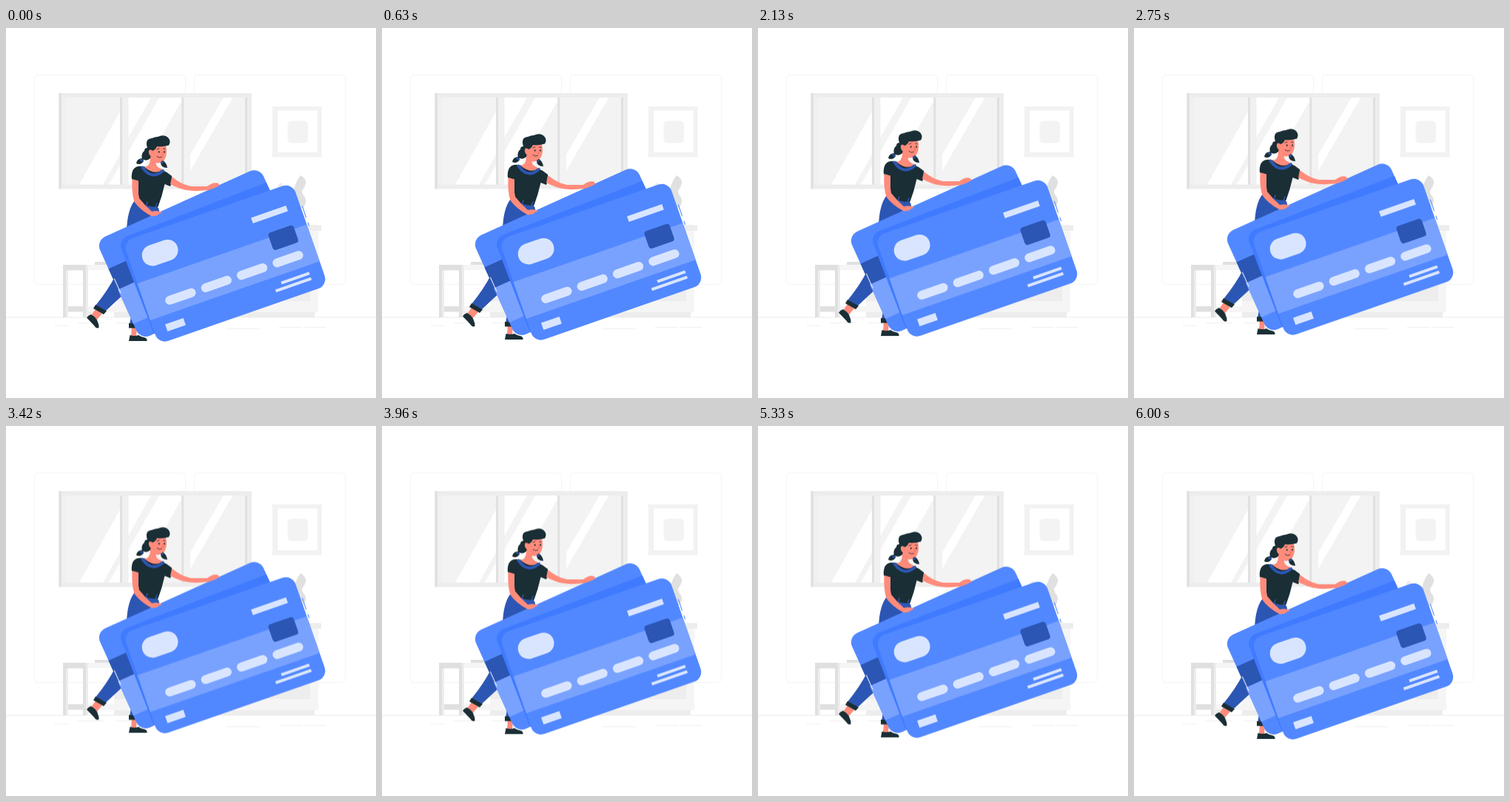
Animation, 500 px wide and 500 px high, one loop 6040 ms. Source, as an HTML page:

```html
<!DOCTYPE html>
<html lang="en">
<head>
<meta charset="utf-8">
<title>Woman with bank cards</title>
<style>
  html, body { margin: 0; width: 100%; height: 100%; overflow: hidden; background: #fff; }
  svg { display: block; width: 100vw; height: 100vh; }
  .float { animation: lift 3020ms linear infinite alternate; }
  @keyframes lift { to { transform: translateY(-9.8px); } }
  .g1 { fill: #f3f3f3; } .g2 { fill: #ededed; } .g3 { fill: #e0e0e0; } .white { fill: #fff; }
  .blue { fill: #5288ff; } .shade { fill: #407bff; } .light { fill: #79a2ff; }
  .navy { fill: #2c56b3; } .pale { fill: #d9e5ff; }
  .skin { fill: #ff8b7b; } .dark { fill: #1a2e35; }
  .line { fill: none; stroke-linecap: round; stroke-linejoin: round; }
</style>
</head>
<body>
<svg viewBox="0 0 500 500">
  <defs>
    <rect id="card" x="-121.2" y="-73.5" width="242.4" height="147" rx="14"/>
    <clipPath id="cardClip"><use href="#card"/></clipPath>
    <clipPath id="backClip"><use href="#card" transform="translate(262.1 304.6) rotate(-24.3)"/></clipPath>
    <rect id="pill" x="-21.5" y="-6" width="43" height="12" rx="6"/>
  </defs>

  <!-- Walls and floor -->
  <g class="line" stroke="#f4f4f4">
    <rect x="38.5" y="63.5" width="204" height="283" rx="5"/>
    <rect x="254.5" y="63.5" width="204" height="283" rx="5"/>
    <path d="M0 391H500" stroke="#ebebeb"/>
    <path d="M66 402.5H82M97 398.5H133M149 398.5H172M297 406.5H343M369 404.5H400M404 404.5H432" stroke="#f1f1f1"/>
  </g>

  <!-- Window -->
  <path class="g2" d="M75 88H332V217.5H75Z"/>
  <path class="g3" d="M71.3 88H75V217.5H71.3Z"/>
  <path class="g1" d="M80.5 94H326V211.5H80.5Z"/>
  <path fill="#f0f0f0" d="M75 94H81V211.5H75ZM157 94H165.5V211.5H157Z"/>
  <g class="white">
    <path d="M154 113V171L131 211.5H99ZM154 185V211.5H139Z"/>
    <path d="M165.5 94H196L165.5 148ZM207 94H237.5V98L173 211.5H165.5V167Z"/>
    <path d="M294 94H306.5L249 193V171Z"/>
  </g>
  <path class="g3" d="M154 94H157V211.5H154ZM237.3 94H240.2V211.5H237.3ZM323 94H326V211.5H323Z"/>

  <!-- Picture frame -->
  <path fill="#f2f2f2" d="M360 106H426.5V174.5H360Z"/>
  <path class="white" d="M367.5 111.5H421V168H367.5Z"/>
  <rect class="g1" x="380.5" y="125.5" width="27.5" height="30" rx="5"/>

  <!-- Desk, cabinet and plant -->
  <path fill="#f5f5f5" d="M108 320H380V266H422V384H146V327H108ZM111 376H146V384H111Z"/>
  <path class="g2" d="M146 328H411V369H146ZM146 384H417V391H146ZM380 266.5H426V274H380Z"/>
  <path fill="#f5f5f5" d="M146 370H422V384H146Z"/>
  <path class="g3" d="M77 320H108V327.5H77ZM77 327H84V391H77ZM104 327H108V391H104ZM84 376H104V383.5H84ZM120 316H139V320H120Z"/>
  <path class="g2" d="M108 320H111V391H108ZM111 383H125V388H111ZM81 328H84V391H81Z"/>
  <path class="g3" d="M398 199Q404 202 405.5 209Q404 215 400 220Q400 224 404 229Q407 235 402 242L392 246Q384 229 391 212Q394 204 398 199Z"/>
  <path class="g2" d="M373 209Q363 211 370 225L384 238Q376 221 373 209Z"/>

  <g class="float">
    <!-- Legs -->
    <path class="skin" d="M121 380L130 386L123 394L116 387ZM170 403H177L176 417H169Z"/>
    <path class="navy" d="M163 274Q164 245 174 233L206 243L218 290L190 330L162 357Q150 368 134 383L121 375Q138 354 147 336Q161 310 163 274Z"/>
    <path class="navy" d="M176 290H226L190 405L167 401Q175 360 176 290Z"/>
    <path class="dark" d="M121 374L136 382.5L132 387L118 379ZM166 399L181 400V405.5H166Z"/>
    <path class="dark" d="M115 387Q122 391 123.5 396Q126 401 125.5 405Q122 407 119 402L109 391.5Q111 388 115 387ZM167.5 415Q174 417 179 415Q183 418 188 418.5Q191 420 190.5 423H166Z"/>

    <!-- Torso -->
    <path class="navy" d="M174 234L205 240V248L190 256L172 246Z"/>
    <path class="dark" d="M184 187Q175 186 171.5 192Q169 198 170 204.5L179 207Q178 223 180 235Q192 243 205.5 241.5Q211 227 214.5 211L222 214Q225 207 224 200Q217 194 209 191Z"/>
    <path class="skin" d="M195 176L203 181Q201 187 211 191Q202 200 187 188Q195 187 195 176Z"/>
    <path class="line" d="M184.5 188.5Q197 206 212 193" stroke="#2c56b3" stroke-width="4"/>
    <path class="line" d="M189 241L191 235M202 242L204 237" stroke="#2c56b3" stroke-width="1.5"/>

    <!-- Head -->
    <path class="skin" d="M195 160Q204 153 216 159Q219 170 214 178Q208 185 199 181Q193 178 192 167Z"/>
    <path class="dark" d="M191 162Q187 150 197 149Q202 147 205 147Q214 143 219 148Q223.5 153 220 158.5Q212 161 204 160Q200 168 195 165Q197 170 195 176Q190 181 184 177Q182 170 187 166Q187 162 191 162Z"/>
    <path class="skin" d="M197 165Q192 163 193 169Q194 174 198 173Z"/>
    <path class="dark" d="M185 176Q177 176 176 183Q182 186 186 180ZM209 181Q209 189 218 189Q217 182 212 179Z"/>
    <path class="line" d="M182 178L185 180M210 182.5L213 180.5" stroke="#2c56b3" stroke-width="2"/>
    <ellipse class="dark" cx="206.7" cy="167.5" rx=".9" ry="1.3"/>
    <ellipse class="dark" cx="214" cy="167.5" rx=".9" ry="1.3"/>
    <path class="line" d="M204 164L207 162.8M212.5 163L215 163.5M204 173.5Q207 176.5 210.5 174.5" stroke="#1a2e35" stroke-width=".8"/>
    <path class="line" d="M211 168L212.5 172L210.5 172" stroke="#e8685b" stroke-width=".8"/>

    <!-- Back card -->
    <g transform="translate(262.1 304.6) rotate(-24.3)">
      <use href="#card" class="blue"/>
      <g clip-path="url(#cardClip)">
        <path class="navy" d="M-122 -32H122V-1H-122Z"/>
        <path class="light" d="M-122 -1H122V50H-122Z"/>
      </g>
    </g>
    <g clip-path="url(#backClip)">
      <rect class="shade" x="-14" y="-14" width="242.4" height="147" rx="14" transform="translate(169 294) rotate(-21)"/>
    </g>
    <path class="line" d="M146.5 339L155 358" stroke="#fff"/>

    <!-- Front card -->
    <g transform="translate(296.5 318.2) rotate(-19.2)">
      <use href="#card" class="blue"/>
      <path class="light" clip-path="url(#cardClip)" d="M-122 -13.5H122V39H-122Z"/>
      <rect class="navy" x="67.2" y="-19.5" width="36.2" height="24.8" rx="4"/>
      <g class="pale">
        <rect x="-103.7" y="-57" width="50" height="28.5" rx="14.25"/>
        <use href="#pill" x="-71.9" y="22.2"/>
        <use href="#pill" x="-20.7" y="22.2"/>
        <use href="#pill" x="30.5" y="22.2"/>
        <use href="#pill" x="81.7" y="22.2"/>
        <path d="M53 -47H103V-39H53ZM-104 51H-78V61H-104ZM62.7 47.8H102.8V51.8H62.7ZM52 55.5H102.8V59.5H52Z"/>
      </g>
    </g>
    <path class="line" d="M402 246L409.5 268" stroke="#fff" stroke-width="2"/>
    <path class="line" d="M400.5 241L405.5 256M408 263L409.5 267.5" stroke="#407bff"/>

    <!-- Arms -->
    <path class="skin" d="M224 201Q238 212 250 214H272Q279 208 286 209.5L289 212.5Q282 217 274 219Q257 221 247 219.5Q235 218 222 211Z"/>
    <path class="skin" d="M170.5 204L179 206.5Q178 221 180 230Q187 239 197 248Q206 246 211 249.5Q206 251 204 253.5L197 254.5Q181 246 173.5 235Q169.5 223 170.5 204Z"/>
  </g>
</svg>
</body>
</html>
```
